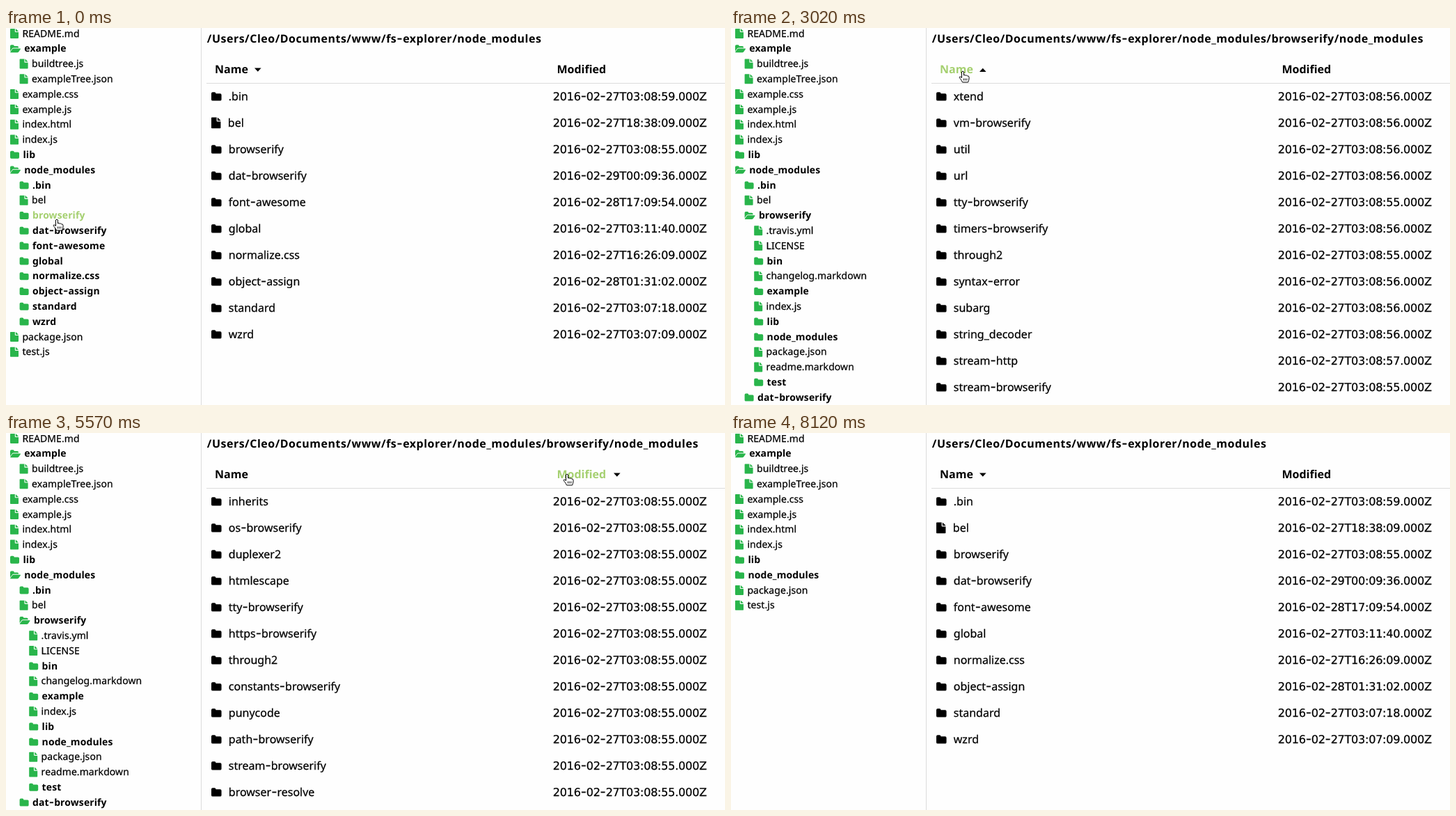
An HTML page for the animation above (9.1 s loop, 1033x542 px).

```html
<!DOCTYPE html>
<html lang="en">
<head>
<meta charset="utf-8">
<title>File explorer</title>
<style>
html, body { margin: 0; width: 100%; height: 100%; overflow: hidden; background: #fefefe; }
svg { display: block; width: 1033px; height: 542px; }
text { font: 16px "Noto Sans", "Open Sans", sans-serif; text-rendering: geometricPrecision; white-space: pre; stroke-width: .25px; }
.tree { font-size: 14px; letter-spacing: .07px; }
.bold { font-weight: 700; }
.treeBold { font-size: 14px; font-weight: 700; letter-spacing: .1px; }
.path { font-weight: 700; letter-spacing: .5px; }
.date { font-family: "DejaVu Sans", sans-serif; letter-spacing: -.22px; }
.bold, .treeBold, .path { stroke-width: 0; }
.hyphen { font-family: Inter, sans-serif; font-size: 1.12em; }
</style>
</head>
<body>
<svg id="stage" viewBox="0 0 1033 542"></svg>
<script>
const LOOP = 9100;
const GREEN = '#29b54b', HOVER = '#a5d070', INK = '#000', RULE = '#dcdcdc';
const stage = document.getElementById('stage');

// Each icon: width, height and outline at 14px type.
const ICONS = {
  f: [12, 14, 'M0 .8Q0 0 .8 0H6.8V4.4Q6.8 5.2 7.6 5.2H12V13.2Q12 14 11.2 14H.8Q0 14 0 13.2ZM7.9 .1Q8.3 .3 8.6 .6L11.4 3.4Q11.8 3.8 11.9 4.1H7.9Z'],
  d: [13, 11, 'M1.7 0H4.1Q5.8 0 5.8 1.8H11.3Q13 1.8 13 3.5V9.3Q13 11 11.3 11H1.7Q0 11 0 9.3V1.7Q0 0 1.7 0Z'],
  o: [15, 11, 'M0 9.2V1.7Q0 0 1.7 0H4.1Q5.8 0 5.8 1.8H10.3Q12 1.8 12 3.5V4.2H5.2Q3.6 4.2 2.6 5.6ZM5 5.2H14.3Q15.4 5.2 14.8 6.2L12.4 9.7Q11.5 11 10.1 11H.8Q-.3 11 .4 10L2.9 6.4Q3.7 5.2 5 5.2Z']
};
const TEXT_GAP = { f: 17.4, d: 18.4, o: 20.3 };

// Tree rows are depth + kind + name.
const treeTop = ['0fREADME.md', '0oexample', '1fbuildtree.js', '1fexampleTree.json', '0fexample.css',
  '0fexample.js', '0findex.html', '0findex.js', '0dlib'];
const treeEnd = ['0fpackage.json', '0ftest.js'];
const modulesHead = ['0onode_modules', '1d.bin', '1fbel'];
const modulesTail = ['1ddat-browserify', '1dfont-awesome', '1dglobal', '1dnormalize.css', '1dobject-assign',
  '1dstandard', '1dwzrd'];
const browserifyFiles = ['f.travis.yml', 'fLICENSE', 'dbin', 'fchangelog.markdown', 'dexample', 'findex.js',
  'dlib', 'dnode_modules', 'fpackage.json', 'freadme.markdown', 'dtest'];
const TREES = {
  start: [...treeTop, ...modulesHead, '1dbrowserify', ...modulesTail, ...treeEnd],
  expanded: [...treeTop, ...modulesHead, '1obrowserify', ...browserifyFiles.map(n => '2' + n), ...modulesTail],
  collapsed: [...treeTop, '0dnode_modules', ...treeEnd]
};

const stamp = day => `2016-${day}.000Z`;
const listing = (rows, days) => rows.map((row, i) => [row, stamp(days[i])]);

const packed = '02-27T03:08:54', released = '01-09T16:59:03';
const seconds = {};
const setSeconds = (s, names) => names.split(' ').forEach(n => seconds[n] = s);
setSeconds(58, '.bin module-deps');
setSeconds(57, 'JSONStream buffer insert-module-globals stream-http resolve');
setSeconds(55, 'browser-resolve constants-browserify inherits os-browserify duplexer2 htmlescape ' +
  'tty-browserify https-browserify through2 punycode path-browserify stream-browserify');
const packages = names => names.split(' ').map(n => ['d' + n, stamp('02-27T03:08:' + (seconds[n] || 56))]);

const ordered = 'assert browser-pack browser-resolve browserify-zlib buffer concat-stream ' +
  'console-browserify constants-browserify crypto-browserify defined';
const LISTS = {
  modules: listing(
    ['d.bin', 'fbel', 'dbrowserify', 'ddat-browserify', 'dfont-awesome', 'dglobal', 'dnormalize.css',
      'dobject-assign', 'dstandard', 'dwzrd'],
    ['02-27T03:08:59', '02-27T18:38:09', '02-27T03:08:55', '02-29T00:09:36', '02-28T17:09:54',
      '02-27T03:11:40', '02-27T16:26:09', '02-28T01:31:02', '02-27T03:07:18', '02-27T03:07:09']),
  browserify: listing(browserifyFiles,
    [released, released, packed, '01-09T18:33:24', packed, released, packed, '02-27T03:08:56',
      packed, released, packed]),
  unsorted: packages('.bin JSONStream ' + ordered),
  nameUp: packages('xtend vm-browserify util url tty-browserify timers-browserify through2 ' +
    'syntax-error subarg string_decoder stream-http stream-browserify'),
  nameDown: packages('.bin ' + ordered + ' deps-sort'),
  dateUp: packages('module-deps .bin buffer insert-module-globals JSONStream stream-http resolve ' +
    'browser-pack vm-browserify crypto-browserify defined deps-sort'),
  dateDown: packages('inherits os-browserify duplexer2 htmlescape tty-browserify https-browserify ' +
    'through2 constants-browserify punycode path-browserify stream-browserify browser-resolve')
};

const ROOT = '/Users/Cleo/Documents/www/fs-explorer/node_modules';
const DEEP = ROOT + '/browserify/node_modules';

// start, tree, list, path, sort column, sort direction
const VIEWS = [
  [0, 'start', 'modules', ROOT, 'Name', 'down'],
  [300, 'expanded', 'browserify', ROOT + '/browserify', 'Name', 'down'],
  [1520, 'expanded', 'unsorted', DEEP, 'Name', 'down'],
  [3020, 'expanded', 'nameUp', DEEP, 'Name', 'up'],
  [3620, 'expanded', 'nameDown', DEEP, 'Name', 'down'],
  [4520, 'expanded', 'dateUp', DEEP, 'Modified', 'up'],
  [4970, 'expanded', 'dateDown', DEEP, 'Modified', 'down'],
  [6770, 'collapsed', 'modules', ROOT, 'Name', 'down']
];

// start, hovered item
const HOVERS = [
  [0, 'tree:browserify'], [600, ''], [1220, 'list:node_modules'], [1520, ''],
  [2570, 'head:Name'], [3770, ''], [4220, 'head:Modified'], [5720, ''],
  [6320, 'tree:node_modules'], [7820, '']
];

// time, x, y of the pointer tip
const POINTER = [
  [0, 73, 275], [450, 73, 275], [1070, 359, 344], [1220, 368, 360], [1520, 368, 360],
  [2270, 357, 28], [2420, 349, 53], [2720, 333, 62], [3620, 333, 62], [4220, 804, 60],
  [4520, 806, 59], [5570, 806, 59], [6170, 86, 215], [6470, 82, 203], [7670, 82, 203],
  [7970, 419, 278], [8120, 419, 278]
];

const latest = (rows, t) => rows.findLast(row => row[0] <= t);

function recordedTime(t) {
  if (t < 770) return Math.min(Math.floor(t / 150) * 150, 600);
  return Math.floor((t - 20) / 150) * 150 + 20;
}

function pointerAt(t) {
  const i = POINTER.findLastIndex(p => p[0] <= t);
  const a = POINTER[i], b = POINTER[i + 1] || a;
  const u = a === b ? 0 : (t - a[0]) / (b[0] - a[0]);
  const k = u * u * (3 - 2 * u);
  return [a[1] + (b[1] - a[1]) * k, a[2] + (b[2] - a[2]) * k];
}

function label(x, y, content, style, fill = INK) {
  const body = content.replace(/-/g, '<tspan class="hyphen">-</tspan>');
  return `<text x="${x}" y="${y}" class="${style}" fill="${fill}" stroke="${fill}">${body}</text>`;
}

function icon(kind, x, middle, scale, fill) {
  const [, h, d] = ICONS[kind];
  return `<path d="${d}" fill="${fill}" transform="translate(${x} ${middle - h * scale / 2}) scale(${scale})"/>`;
}

function drawTree(rows, hover) {
  return rows.map((row, i) => {
    const kind = row[1], name = row.slice(2);
    const x = 6 + 13.6 * row[0], y = 12.5 + 21.8 * i;
    const hot = hover === 'tree:' + name && row[0] < 2;
    return icon(kind, x, y - 4.6, 1, GREEN) +
      label(x + TEXT_GAP[kind], y, name, kind === 'f' ? 'tree' : 'treeBold', hot ? HOVER : INK);
  }).join('');
}

function drawList(rows, hover) {
  return rows.map(([row, date], i) => {
    const kind = row[0], name = row.slice(1), y = 104 + 38 * i;
    return icon(kind, 295, y - 5.6, 1.12, INK) +
      label(kind === 'f' ? 318.8 : 319.8, y, name, '', hover === 'list:' + name ? HOVER : INK) +
      label(785.8, y, date, 'date');
  }).join('');
}

function drawHeader(path, column, direction, hover) {
  const head = (x, name) => label(x, 65, name, 'bold', hover === 'head:' + name ? HOVER : INK);
  const x = column === 'Name' ? 357 : 873;
  const arrow = direction === 'down' ? `M${x} 57.5h9.6l-4.8 5.2z` : `M${x} 63h9.6l-4.8 -5.2z`;
  return label(288.8, 21, path, 'path') + head(300, 'Name') + head(791.4, 'Modified') +
    `<path d="${arrow}"/>` +
    `<path d="M280.5 0V542M288 79.5H1033" stroke="${RULE}" fill="none"/>`;
}

function drawPointer([x, y], hand) {
  const shape = hand
    ? `<path d="M-1.5 1Q0 -.8 1.5 1V6Q3 4.8 4.2 6.3Q5.8 5.4 6.8 7Q8.8 6.6 9 8.6V11Q8.8 13 7.6 16H-.5Q-1.5 13.5 -3.2 11.5Q-5.6 9 -4.5 8.2Q-3.3 7.5 -1.5 9.5Z" fill="#fff" stroke="#000" stroke-linejoin="round"/>
       <path d="M1.5 10.5V13.5M3.7 10.5V13.5M5.9 10.5V13.5" stroke="#000" stroke-width=".9"/>`
    : `<path d="M1 2V15L4 12L6.2 17L8.6 16L6.4 11H10.5Z" fill="#000" opacity=".18"/>
       <path d="M0 0V13L3 10.3L5.2 15.4L7.4 14.5L5.3 9.5H9.3Z" fill="#000" stroke="#fff" stroke-width=".9"/>`;
  return `<g transform="translate(${x} ${y})">${shape}</g>`;
}

function render(t) {
  const [, tree, list, path, column, direction] = latest(VIEWS, t);
  const hover = latest(HOVERS, t)[1];
  stage.innerHTML = drawTree(TREES[tree], hover) +
    drawHeader(path, column, direction, hover) +
    drawList(LISTS[list], hover) +
    (t < 8120 ? drawPointer(pointerAt(t), hover !== '') : '');
}

let shown = -1;
function tick() {
  const t = recordedTime(performance.now() % LOOP);
  if (t !== shown) render(shown = t);
  requestAnimationFrame(tick);
}
tick();
</script>
</body>
</html>
```
